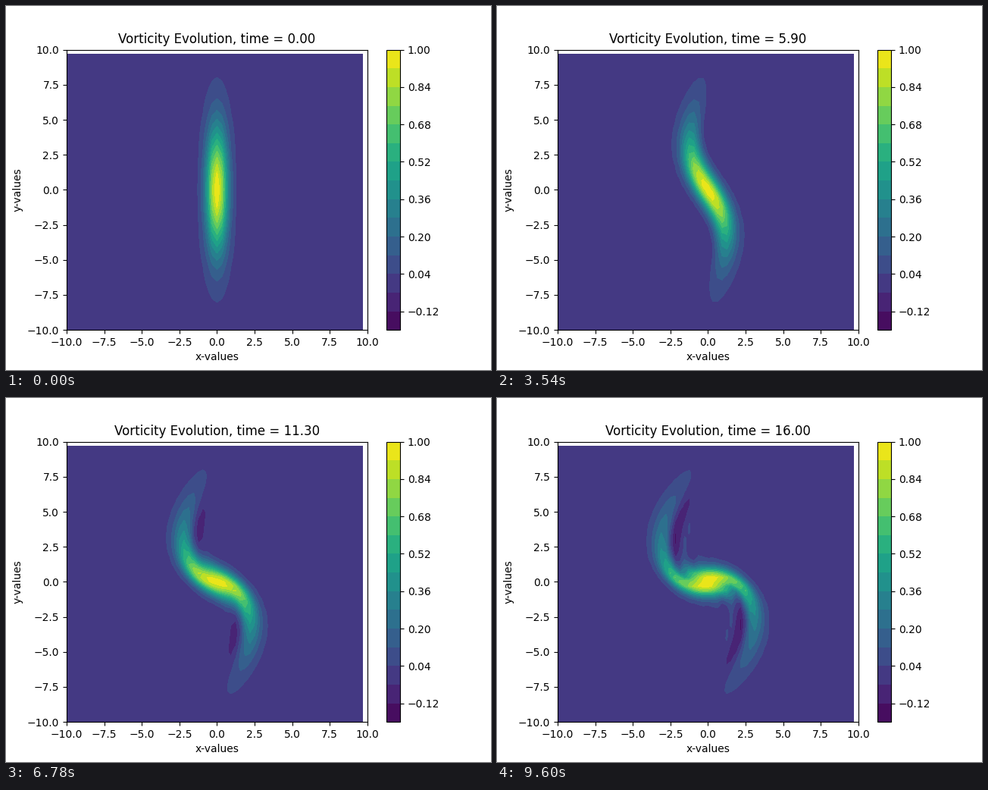
These frames come from a looping animation (640x480 px, 9.66 s). A matplotlib script:

```python
import numpy as np
import matplotlib.pyplot as plt
from matplotlib.animation import FuncAnimation

N, HALF = 64, 10.0
NU = 0.001
FRAMES, INTERVAL = 161, 60
DT, SUBSTEPS = 0.1, 2

dx = 2 * HALF / N
grid = np.linspace(-HALF, HALF, N + 1)[:N]
X, Y = np.meshgrid(grid, grid)

k = 2 * np.pi * np.fft.fftfreq(N, dx)
K2 = k[None, :] ** 2 + k[:, None] ** 2
K2[0, 0] = 1.0


def diff(f, axis):
    """Periodic central difference."""
    return (np.roll(f, -1, axis) - np.roll(f, 1, axis)) / (2 * dx)


def laplacian(f):
    shifted = sum(np.roll(f, s, a) for s in (-1, 1) for a in (0, 1))
    return (shifted - 4 * f) / dx**2


def streamfunction(w):
    w_hat = np.fft.fft2(w)
    w_hat[0, 0] = 0
    return np.real(np.fft.ifft2(-w_hat / K2))


def rate(w):
    psi = streamfunction(w)
    advection = diff(psi, 1) * diff(w, 0) - diff(psi, 0) * diff(w, 1)
    return NU * laplacian(w) - advection


def rk4(w, h):
    k1 = rate(w)
    k2 = rate(w + h / 2 * k1)
    k3 = rate(w + h / 2 * k2)
    k4 = rate(w + h * k3)
    return w + h / 6 * (k1 + 2 * k2 + 2 * k3 + k4)


def solve():
    w = np.exp(-2 * X**2 - Y**2 / 20)
    states = [w]
    for _ in range(FRAMES - 1):
        for _ in range(SUBSTEPS):
            w = rk4(w, DT / SUBSTEPS)
        states.append(w)
    return states


states = solve()
levels = np.linspace(-0.2, 1.0, 16)

fig, ax = plt.subplots(figsize=(6.4, 4.8), dpi=100)


def draw_field(i):
    # Overshoot past the top level would leave a hole.
    field = np.minimum(states[i], 1.0)
    return ax.contourf(X, Y, field, levels=levels, cmap="viridis")


contours = draw_field(0)
fig.colorbar(contours, ax=ax, ticks=levels[1::2])
ax.set_xlim(-HALF, HALF)
ax.set_ylim(-HALF, HALF)
ax.set_xlabel("x-values")
ax.set_ylabel("y-values")
title = ax.set_title("")


def update(i):
    global contours
    contours.remove()
    contours = draw_field(i)
    title.set_text(f"Vorticity Evolution, time = {i * DT:.2f}")
    return contours, title


anim = FuncAnimation(fig, update, frames=FRAMES, interval=INTERVAL,
                     repeat=True, repeat_delay=0, blit=False)
plt.show()
```
